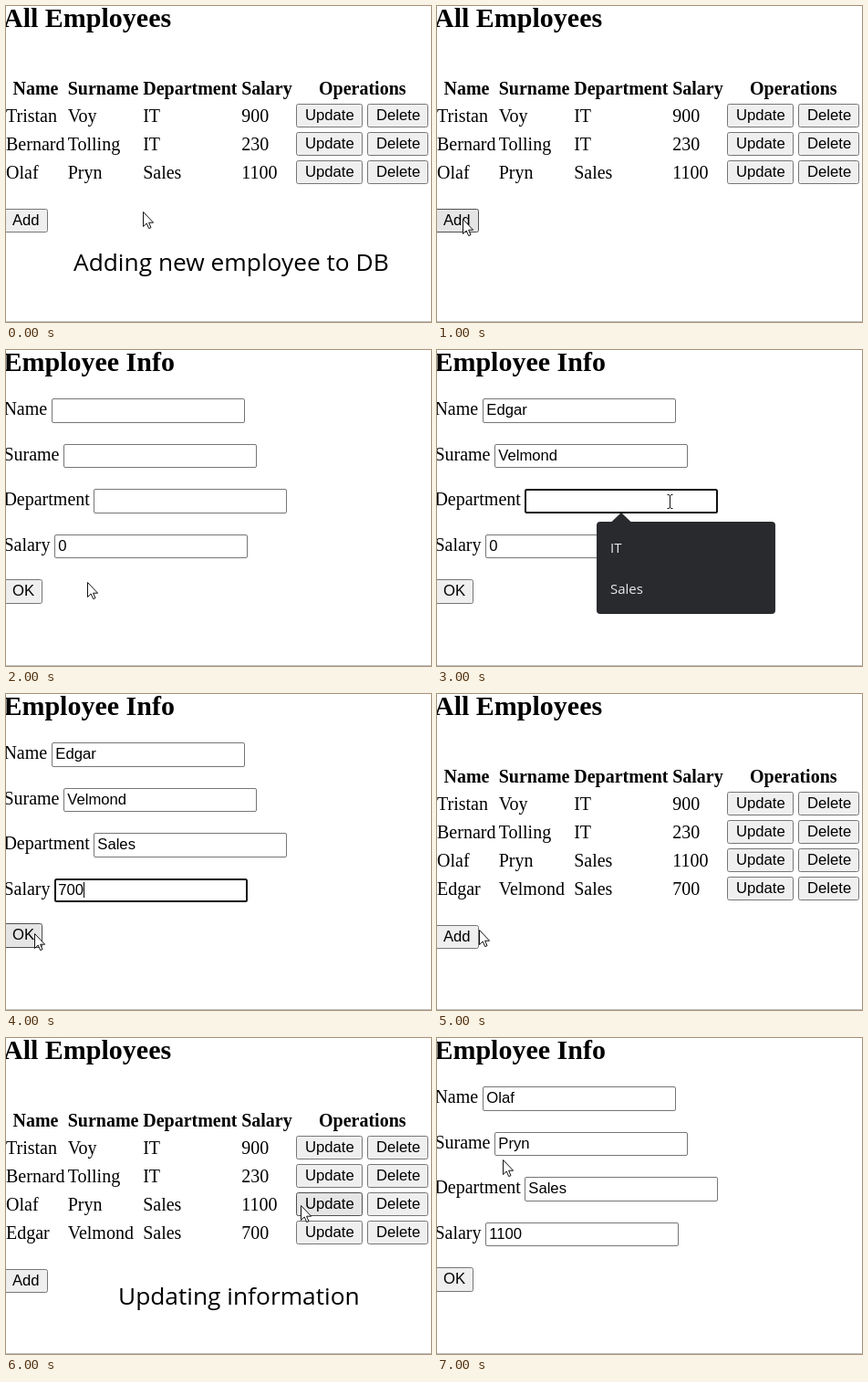
Write an HTML page that moves like this. It is 466x346 px and loops after 8000 ms.

```html
<!DOCTYPE html>
<html lang="en">
<head>
<meta charset="utf-8">
<title>Employee manager demo</title>
<style>
  html, body { margin: 0; width: 100%; height: 100%; overflow: hidden; background: #fff; }
  svg { display: block; width: 466px; height: 346px; }
  text { white-space: pre; }
  .serif { font: 20px "Liberation Serif", "Times New Roman", serif; }
  .head { font-weight: bold; }
  .title { font-size: 30px; font-weight: bold; }
  .ui { font: 16.67px "Liberation Sans", Arial, sans-serif; }
  .caption { font: 26.3px "Open Sans", "Noto Sans", sans-serif; }
  .option { font: 15px "Open Sans", "Noto Sans", sans-serif; fill: #e8eaed; }
  .button { fill: #efefef; stroke: #767676; }
  .button.hover { fill: #e5e5e5; stroke: #4f4f4f; }
  .field { fill: #fff; stroke: #767676; }
  .field.focus { stroke: #101010; stroke-width: 2; }
  .scene { visibility: hidden; animation: show 8s step-end infinite; }
  @keyframes show {
    0% { visibility: visible; }
    12.5%, 100% { visibility: hidden; }
  }
</style>
</head>
<body>
<svg id="stage" viewBox="0 0 466 346"></svg>
<script>
const staff = [
  ["Tristan", "Voy", "IT", "900"],
  ["Bernard", "Tolling", "IT", "230"],
  ["Olaf", "Pryn", "Sales", "1100"],
  ["Edgar", "Velmond", "Sales", "700"]
];
const columns = [0, 67.7, 150.2, 258.2];

const text = (x, y, s, cls) => `<text x="${x}" y="${y}" class="${cls}">${s}</text>`;

const box = (x, y, w, h, r, cls, inset = 0.5) =>
  `<rect x="${x + inset}" y="${y + inset}" width="${w - 2 * inset}" height="${h - 2 * inset}" rx="${r}" class="${cls}"/>`;

const button = (x, y, w, label, hover, h = 26) =>
  box(x, y, w, h, 2, hover ? "button hover" : "button") + text(x + 10, y + 18, label, "ui");

const arrow = (x, y) =>
  `<path transform="translate(${x} ${y})" d="M.5 .5V16.5L4.2 13L6.7 18.6L9 17.6L6.6 12.2H11.6Z"
    fill="#fff" stroke="#111" stroke-width="1"/>`;

const beam = (x, y) =>
  `<path transform="translate(${x} ${y})" d="M-2.5 .5H-1L.5 1.5L2 .5H3.5M.5 1.5V14.5M-2.5 15.5H-1L.5 14.5L2 15.5H3.5"
    fill="none" stroke="#111"/>`;

function list(count, hover) {
  const heads = [[7.5, "Name"], [67.7, "Surname"], [150.2, "Department"], [258.2, "Salary"], [343, "Operations"]];
  let out = text(-3, 23, "All Employees", "serif title");
  for (const [x, s] of heads) out += text(x, 97, s, "serif head");
  staff.slice(0, count).forEach((row, i) => {
    const y = 107 + 31 * i;
    row.forEach((s, c) => out += text(columns[c], y + 20, s, "serif"));
    out += button(318, y, 73, "Update", hover === i) + button(396, y, 67, "Delete");
  });
  return out + button(-3, 129 + 31 * count, 49, "Add", hover === "add");
}

function form(values, focus, hover) {
  const fields = [["Name", 50, 53, 27], ["Surame", 63, 103, 26], ["Department", 96, 152, 27], ["Salary", 53, 202, 26]];
  let out = text(-2.6, 23, "Employee Info", "serif title");
  fields.forEach(([label, x, y, h], i) => {
    const on = focus === i;
    out += text(-2.6, y + 18, label, "serif")
      + box(x, y, 212, h, 1.5, on ? "field focus" : "field", on ? 1 : 0.5)
      + text(x + 4.3, y + 18, values[i], "ui");
  });
  return out + button(-3, 251, 43, "OK", hover, 27);
}

const menu = '<path d="M191 188.5L202 178L213 188.5Z" fill="#292a2d"/>'
  + '<rect x="175" y="188" width="196" height="101" rx="4" fill="#292a2d"/>'
  + text(190, 222, "IT", "option") + text(190, 267, "Sales", "option");
const caret = '<path d="M85.5 206V223" stroke="#000"/>';
const added = staff[3];

// One scene per second
const scenes = [
  list(3) + text(74, 290, "Adding new employee to DB", "caption") + arrow(150, 225),
  list(3, "add") + arrow(28, 233),
  form(["", "", "", "0"]) + arrow(89, 254),
  form([added[0], added[1], "", "0"], 2) + menu + beam(255, 158),
  form(added, 3, true) + caret + arrow(31, 262),
  list(4) + arrow(46, 258),
  list(4, 2) + text(123, 292, "Updating information", "caption") + arrow(323, 183),
  form(staff[2]) + arrow(72, 133)
];

document.getElementById("stage").innerHTML = scenes
  .map((s, i) => `<g class="scene" style="animation-delay:${i - scenes.length}s">${s}</g>`)
  .join("") + '<path d="M0 345.5H466" stroke="#bdbdbd"/>';
</script>
</body>
</html>
```
